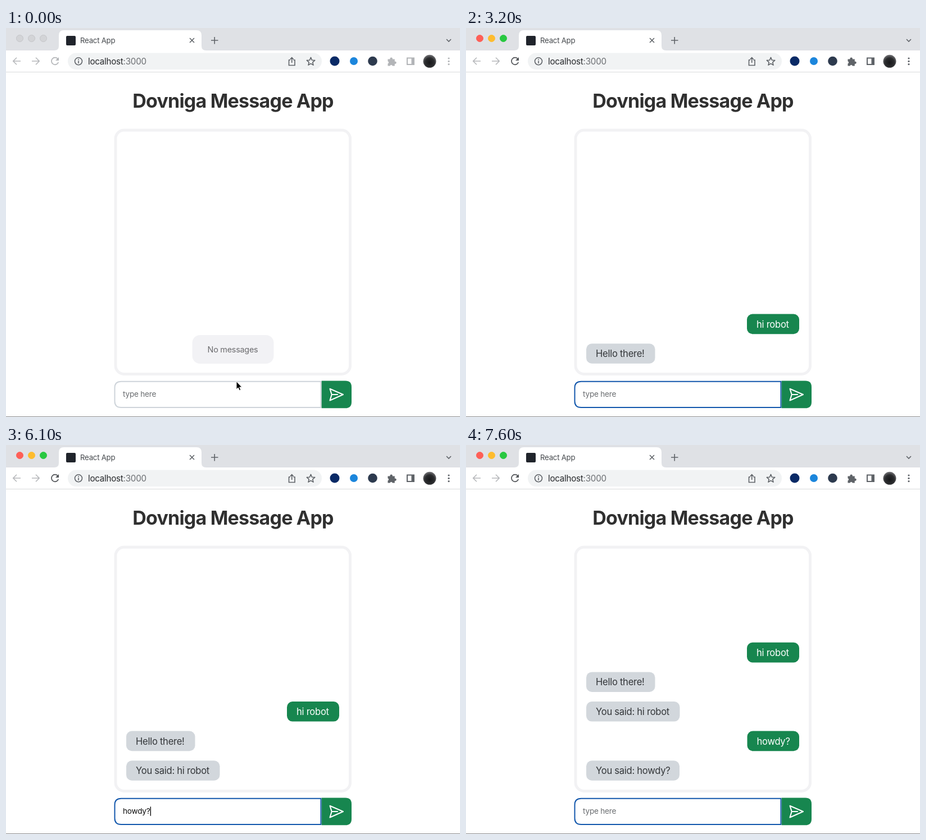
Write an HTML page that moves like this. It is 808 px wide and 693 px high and loops after 8000 ms.

```html
<!DOCTYPE html>
<html lang="en">
<head>
<meta charset="utf-8">
<title>Message App</title>
<style>
  html, body { margin: 0; width: 100%; height: 100%; overflow: hidden; background: #fff; }
  svg { display: block; width: 808px; height: 693px; }
  text { font-family: Inter, Roboto, sans-serif; letter-spacing: -0.017em; white-space: pre; }
  .line { fill: none; stroke: #5f6368; stroke-width: 1.6; }
  .soft { stroke: #b6b8bb; }
  .field { font-size: 13.6px; }
</style>
</head>
<body>
<svg viewBox="0 0 808 693">
  <defs>
    <radialGradient id="avatar" cx=".5" cy=".6" r=".6">
      <stop offset="0" stop-color="#17181a"/>
      <stop offset=".6" stop-color="#2b2c2e"/>
      <stop offset="1" stop-color="#77777a"/>
    </radialGradient>
  </defs>
  <rect width="808" height="693" fill="#fff"/>

  <!-- tab strip -->
  <rect width="808" height="40" fill="#dfe1e5"/>
  <path d="M86 40Q94 40 94 32V13Q94 4 103 4H339Q348 4 348 13V32Q348 40 356 40Z" fill="#fff"/>
  <g id="lights" stroke-width="1">
    <circle cx="24.5" cy="18.5" r="6"/>
    <circle cx="45.5" cy="18.5" r="6"/>
    <circle cx="66.5" cy="18.5" r="6"/>
  </g>
  <rect x="107" y="14" width="17" height="17" rx="2" fill="#20242b"/>
  <text x="132" y="26.8" font-size="13.2" fill="#45494d">React App</text>
  <path class="line" d="M327 18l8 8m0-8l-8 8M365 22h12.500M371.200 16v12.500"/>
  <path class="line" d="M784 20l4 4 4-4"/>

  <!-- toolbar -->
  <rect y="78" width="808" height="1" fill="#d9dadc"/>
  <rect x="110" y="44.500" width="452" height="29.500" rx="14.750" fill="#f1f3f4"/>
  <path class="line soft" d="M26 59H13m6-6.200L12.800 59l6.200 6.200M46 59h13m-6-6.200L59.200 59 53 65.200"/>
  <g id="reload">
    <path d="M92.300 55.200A6.300 6.300 0 1 0 93.200 61" fill="none" stroke="currentColor" stroke-width="1.7"/>
    <path d="M94 52v6h-6z" fill="currentColor"/>
  </g>
  <circle class="line" cx="129" cy="59.300" r="6.500"/>
  <path class="line" d="M129 58.300v4.700M129 55.300v1.600"/>
  <text x="146" y="64.600" font-size="15.200" fill="#27292c">localhost<tspan fill="#6b6e72">:3000</tspan></text>
  <path class="line" stroke-width="1.3" d="M506 57h-2.500v9.500h10.500V57h-2.500M508.700 62v-8.500M505.700 55.700l3-3 3 3"/>
  <path id="star" class="line" stroke-linejoin="round"/>
  <circle cx="585" cy="59" r="8.500" fill="#0a2a66"/>
  <circle cx="619" cy="59" r="7" fill="#1c86dc"/>
  <circle cx="652.500" cy="59" r="8.300" fill="#2d3a4e"/>
  <g id="tools" fill="currentColor">
    <path d="M679.500 55.500h4a2.300 2.300 0 1 1 4.300 0h4v4.200a2.200 2.200 0 1 1 0 4.100V67.500h-4a2.300 2.300 0 0 0-4.400 0h-3.900v-4a2.200 2.200 0 0 0 0-4.200z"/>
    <path d="M713 52.500h14v13.500h-14zM715 54.500v9.500h6.500v-9.500z" fill-rule="evenodd"/>
    <circle cx="788" cy="54" r="1.600"/>
    <circle cx="788" cy="59.300" r="1.600"/>
    <circle cx="788" cy="64.600" r="1.600"/>
  </g>
  <circle cx="754" cy="59.300" r="11.500" fill="url(#avatar)"/>

  <!-- page -->
  <text x="404" y="142.300" font-size="34" font-weight="700" text-anchor="middle" fill="#303030" style="letter-spacing:-.8px">Dovniga Message App</text>
  <rect x="195" y="182" width="417.500" height="434.500" rx="15" fill="#fff" stroke="#f2f2f4" stroke-width="5"/>
  <g id="empty">
    <rect x="331.500" y="547" width="145" height="51" rx="14" fill="#f2f2f5"/>
    <text id="emptyText" x="403.500" y="577.500" font-size="14.400" text-anchor="middle">No messages</text>
  </g>
  <g id="chat"></g>
  <path id="box" d="M560.500 629.700V676H205Q193.500 676 193.500 665V641Q193.500 629.700 205 629.700Z" fill="#fff" stroke-width="2"/>
  <text id="hint" class="field" x="208" y="657" fill="#6a6d70">type here</text>
  <text id="typed" class="field" x="208" y="657" fill="#0c0c0c"></text>
  <rect id="caret" y="644.300" width="1.400" height="16.400" fill="#111"/>
  <path d="M561.700 628.500H604Q615 628.500 615 639.500V666.500Q615 677.300 604 677.300H561.700Z" fill="#17864f"/>
  <path d="M576.500 642.800L600 653 576.500 663.500 579.700 653ZM579.700 653H590" fill="none" stroke="#fff" stroke-width="2.100" stroke-linejoin="round" stroke-linecap="round"/>
  <path id="pointer" d="M410 629.500V643.800L413.200 640.800 415.400 645.700 417.800 644.600 415.700 639.900H420Z" fill="#000" stroke="#fff" stroke-width="1"/>
  <rect y="692" width="808" height="1" fill="#8b8b8d"/>
</svg>
<script>
const LOOP = 8000, ACTIVE = 100, STEP = 52.6;
const $ = id => document.getElementById(id);
const show = (node, on) => node.setAttribute('visibility', on ? 'visible' : 'hidden');

const messages = [
  { text: 'hi robot', mine: true, width: 93, at: 2600 },
  { text: 'Hello there!', width: 122.5, at: 3000 },
  { text: 'You said: hi robot', width: 166.5, at: 3700 },
  { text: 'howdy?', mine: true, width: 92.5, at: 6500 },
  { text: 'You said: howdy?', width: 166, at: 7000 }
];

// Key press times, one per character, and the moment of sending
const entries = [
  { text: 'hi robot', keys: [1000, 1200, 1600, 1700, 1900, 2100, 2200, 2400], send: 2600 },
  { text: 'howdy?', keys: [5000, 5100, 5200, 5400, 5600, 6100], send: 6500 }
];

// Spans in which the caret is lit
const caretOn = [[200, 700], [1000, 3200], [3700, 4300], [4800, 6600], [7100, 7600]];

function svg(tag, attrs, parent) {
  const node = document.createElementNS('http://www.w3.org/2000/svg', tag);
  for (const key in attrs) node.setAttribute(key, attrs[key]);
  return parent.appendChild(node);
}

for (const m of messages) {
  const x = m.mine ? 593 - m.width : 214;
  m.node = svg('g', {}, $('chat'));
  svg('rect', { x, y: 562.2, width: m.width, height: 35.6, rx: 10, fill: m.mine ? '#17864f' : '#d2d7dc' }, m.node);
  svg('text', { x: x + 17, y: 586.2, 'font-size': 16.6, fill: m.mine ? '#fff' : '#333639' }, m.node)
    .textContent = m.text;
}

const starPoints = Array.from({ length: 10 }, (_, i) => {
  const r = i % 2 ? 3.4 : 7.6, a = i * Math.PI / 5;
  return (542.5 + r * Math.sin(a)).toFixed(2) + ' ' + (60 - r * Math.cos(a)).toFixed(2);
});
$('star').setAttribute('d', 'M' + starPoints.join('L') + 'Z');

function mix(a, b, k) {
  return `rgb(${a.map((v, i) => Math.round(v + (b[i] - v) * k))})`;
}

function drawWindow(t) {
  const active = t >= ACTIVE;
  const colors = ['#fe5f57', '#febc2e', '#28c840'];
  [...$('lights').children].forEach((dot, i) => {
    dot.setAttribute('fill', active ? colors[i] : '#d3d4d7');
    dot.setAttribute('stroke', active ? colors[i] : '#c4c5c8');
  });
  $('reload').setAttribute('color', active ? '#505357' : '#b3b5b8');
  $('tools').setAttribute('color', active ? '#5f6368' : '#b3b5b8');
  const focus = Math.min(1, Math.max(0, (t - ACTIVE) / 150));
  $('box').setAttribute('stroke', mix([206, 212, 218], [18, 87, 172], focus));
  show($('pointer'), t < 1000);
}

function drawChat(t) {
  const shown = messages.filter(m => t >= m.at).length;
  messages.forEach((m, i) => {
    show(m.node, i < shown);
    m.node.setAttribute('transform', `translate(0 ${-STEP * Math.max(0, shown - 1 - i)})`);
  });
  show($('empty'), t < messages[1].at);
  $('emptyText').setAttribute('fill', t < messages[0].at ? '#6b6b6e' : '#fff');
}

function drawField(t) {
  const entry = entries.find(e => t >= e.keys[0] && t < e.send);
  const text = entry ? entry.text.slice(0, entry.keys.filter(k => t >= k).length) : '';
  const typed = $('typed');
  if (typed.textContent !== text) typed.textContent = text;
  show($('hint'), !text);
  $('caret').setAttribute('x', 208.2 + (text ? typed.getComputedTextLength() : 0));
  show($('caret'), caretOn.some(([from, to]) => t >= from && t < to));
}

function draw(t) {
  drawWindow(t);
  drawChat(t);
  drawField(t);
}

function tick() {
  draw(performance.now() % LOOP);
  requestAnimationFrame(tick);
}
tick();
</script>
</body>
</html>
```
